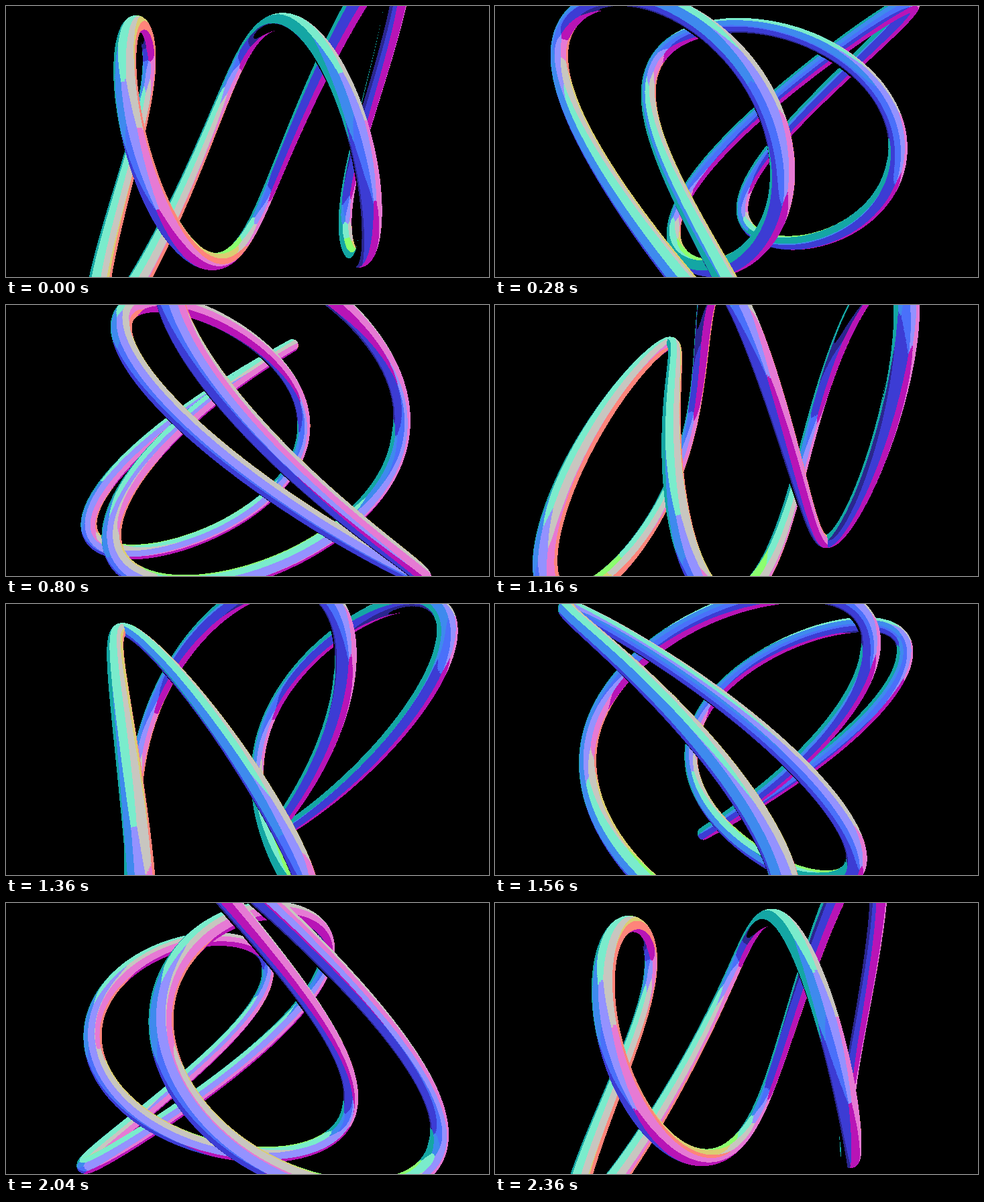
Animation of 720x405 px, one loop 2.4 s. Source, as an HTML page with a canvas:

```html
<!DOCTYPE html>
<html>
<head>
<meta charset="utf-8">
<style>
  html, body { margin: 0; height: 100%; overflow: hidden; background: #000; }
  canvas { display: block; }
</style>
</head>
<body>
<canvas id="stage" width="720" height="405"></canvas>
<script>
const W = 720, H = 405, CX = W / 2, CY = H / 2;
const LOOP = 2400, FOCAL = 642, SIZE = 192, RADIUS = 12.5, COUNT = 1600;
const BLACK = 0xff000000, DARKEST = 245;

const ctx = document.getElementById('stage').getContext('2d');
const image = ctx.createImageData(W, H);
const pixels = new Uint32Array(image.data.buffer);
const depth = new Float32Array(W * H);
const owner = new Int16Array(W * H);

// Colours that the surface normals are reduced to.
const palette = [
  [148, 146, 255], [74, 112, 250], [62, 138, 238], [60, 60, 212], [42, 38, 142],
  [230, 122, 212], [255, 132, 122], [184, 20, 182], [122, 236, 204],
  [20, 166, 164], [218, 206, 114], [200, 198, 192], [140, 255, 110]
];

// Closed curve with frequencies 1, 3 and 4 (y down, z away from the viewer).
const knot = Array.from({ length: COUNT }, (_, i) => {
  const u = i / COUNT * 2 * Math.PI;
  return [Math.cos(u), -Math.cos(3 * u - 1.975), -Math.cos(4 * u - 2.6)].map(v => v * SIZE);
});

function turn(angle) {
  const c = Math.cos(angle), s = Math.sin(angle);
  return knot.map(([x, y, z]) => [x * c - z * s, y, x * s + z * c + FOCAL]);
}

// Ray-cast one ball of the tube into the depth buffer.
function castBall([x, y, z], index) {
  const scale = FOCAL / z, reach = RADIUS * scale * 1.2 + 1;
  const sx = CX + x * scale, sy = CY + y * scale;
  const x0 = Math.max(0, Math.floor(sx - reach)), x1 = Math.min(W - 1, Math.ceil(sx + reach));
  const y0 = Math.max(0, Math.floor(sy - reach)), y1 = Math.min(H - 1, Math.ceil(sy + reach));
  const k = x * x + y * y + z * z - RADIUS * RADIUS;
  for (let py = y0; py <= y1; py++) {
    const dy = py + 0.5 - CY;
    for (let px = x0; px <= x1; px++) {
      const dx = px + 0.5 - CX;
      const dd = dx * dx + dy * dy + FOCAL * FOCAL;
      const b = dx * x + dy * y + FOCAL * z;
      const disc = b * b - dd * k;
      if (disc < 0) continue;
      const t = (b - Math.sqrt(disc)) / dd, p = py * W + px;
      if (t < depth[p]) {
        depth[p] = t;
        owner[p] = index;
      }
    }
  }
}

function nearestColour(r, g, b) {
  if (r + g + b < DARKEST) return BLACK;
  let best = Infinity, pick;
  for (const colour of palette) {
    const dr = colour[0] - r, dg = colour[1] - g, db = colour[2] - b;
    const d = dr * dr + dg * dg + db * db;
    if (d < best) {
      best = d;
      pick = colour;
    }
  }
  return (255 << 24 | pick[2] << 16 | pick[1] << 8 | pick[0]) >>> 0;
}

function shade(p, points) {
  const i = owner[p], t = depth[p], c = points[i];
  const a = points[(i + COUNT - 1) % COUNT], b = points[(i + 1) % COUNT];
  const tx = b[0] - a[0], ty = b[1] - a[1], tz = b[2] - a[2];
  let nx = (p % W + 0.5 - CX) * t - c[0];
  let ny = (Math.floor(p / W) + 0.5 - CY) * t - c[1];
  let nz = FOCAL * t - c[2];
  // Keep the part of the normal that is square to the tube.
  const along = (nx * tx + ny * ty + nz * tz) / (tx * tx + ty * ty + tz * tz);
  nx -= along * tx;
  ny -= along * ty;
  nz -= along * tz;
  const m = 127.5 / (Math.sqrt(nx * nx + ny * ny + nz * nz) || 1);
  return nearestColour(127.5 + nx * m, 127.5 - ny * m, 127.5 - nz * m);
}

function draw() {
  const points = turn(performance.now() % LOOP / LOOP * 2 * Math.PI);
  depth.fill(Infinity);
  points.forEach(castBall);
  for (let p = 0; p < pixels.length; p++) {
    pixels[p] = depth[p] < Infinity ? shade(p, points) : BLACK;
  }
  ctx.putImageData(image, 0, 0);
  requestAnimationFrame(draw);
}
draw();
</script>
</body>
</html>
```
